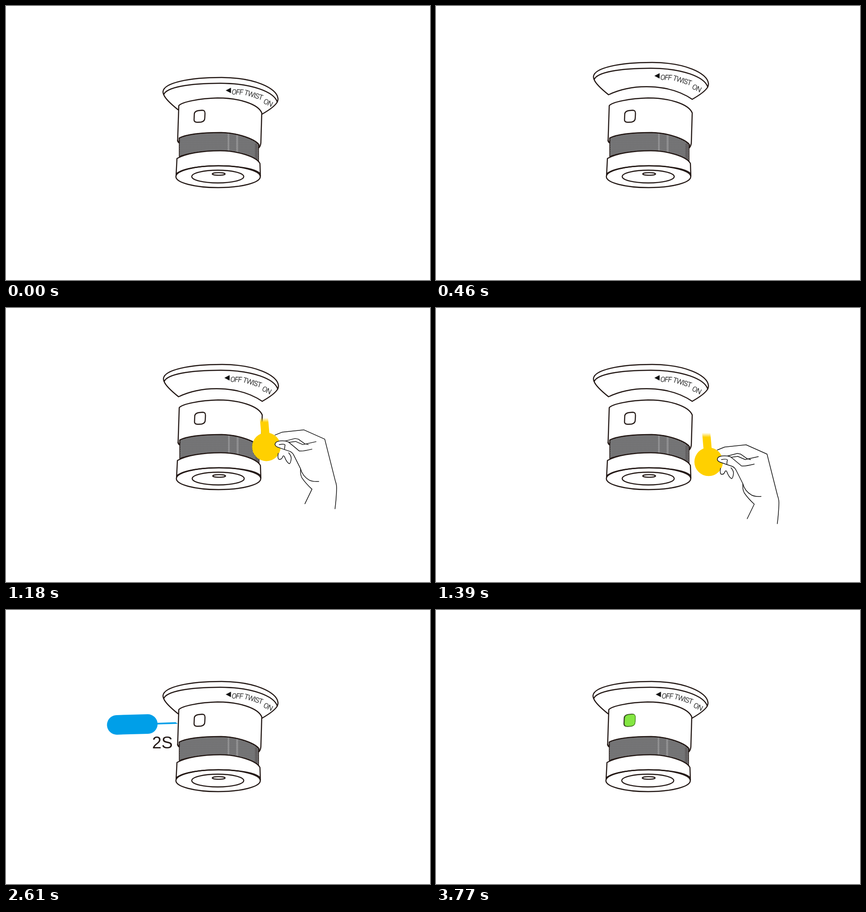
Animation of 930 by 602 pixels, one loop 4.87 s. Source, as an HTML page:

```html
<!DOCTYPE html>
<html lang="en">
<head>
<meta charset="utf-8">
<title>Smoke detector setup</title>
<style>
  html, body { margin: 0; width: 100%; height: 100%; overflow: hidden; background: #fff; }
  svg { display: block; }
  .device path, .device ellipse { fill: #fff; stroke: #231815; stroke-width: 2.4; stroke-linejoin: round; stroke-linecap: round; }
  .device .open { fill: none; }
  .device .mesh { fill: url(#weave); stroke-width: 1.6; }
  .device .streak { fill: none; stroke: #fff; stroke-width: 4; opacity: .2; stroke-linecap: butt; }
  .device .shade { fill: none; stroke-width: 6; opacity: .2; stroke-linecap: butt; }
  #label path { fill: #111; stroke: none; }
  #label text { font: 300 15.5px Roboto, Arial, sans-serif; letter-spacing: -.9px; fill: #111; stroke: #111; stroke-width: .25; }
  #hand .line { fill: #fff; stroke: #111; stroke-width: 1.5; stroke-linejoin: round; stroke-linecap: round; }
  #hand .back { fill: none; }
  #count { font: 37px "Liberation Sans", Arial, sans-serif; fill: #231815; }
</style>
</head>
<body>
<svg width="930" height="602" viewBox="0 0 930 602">
  <defs>
    <pattern id="weave" width="3" height="4" patternUnits="userSpaceOnUse">
      <rect width="3" height="4" fill="#bcbcbf"/>
      <path d="M.5 -1L2.500 1L.5 3L2.500 5" style="fill:none;stroke:#333;stroke-width:1.2"/>
    </pattern>
    <linearGradient id="tip" gradientUnits="userSpaceOnUse" x1="0" y1="213" x2="0" y2="223">
      <stop offset="0" stop-color="#ffd000" stop-opacity="0"/>
      <stop offset="1" stop-color="#ffd000"/>
    </linearGradient>
  </defs>

  <g id="scene">
    <g class="device">
      <g id="plate">
        <path d="M344.5 187.500C347 169 400 157 473 157C545 157.500 594 180 596.500 203Q597 207 595 211C590 220 575 230 561 238C510 203 430 203 377.500 228C365 218 350 205 346 195Q344 191 344.500 187.500Z"/>
        <path class="open" d="M346 194.500C352 179 400 169.700 470 169.700C540 170 588 189 595 211"/>
      </g>
      <g id="label">
        <path d="M482 185.500L493.500 179.500V191.500Z"/>
        <text transform="translate(495 194) rotate(2)" style="font-style:italic">OFF</text>
        <text transform="translate(521.500 194.500) rotate(17)">TWIST</text>
        <text transform="translate(563.500 213) rotate(26)">ON</text>
      </g>
      <g id="body">
        <path d="M379 219C385 211 425 203 464 202C510 202 553 215 561 235L559 301Q558 309 554 312L380 301Q376 298 376.500 295Z"/>
        <path class="mesh" d="M380 290C400 280 440 278 472 278C512 279 545 293 554 304V343C530 324 500 318 470 318C430 318 395 324 380 331Z"/>
        <path class="streak" d="M488 280V319M507 284V322"/>
        <path class="shade" d="M549 302V338"/>
        <path class="open" d="M376.500 295Q377 299 380 300V290C400 280 440 278 472 278C512 279 548 294 555 305L554 312"/>
        <path d="M375 335C395 324 430 318 470 318C505 318 549 330 557 346L558 374L373 374Z"/>
        <ellipse cx="465.200" cy="375" rx="92.500" ry="24"/>
        <path class="open" d="M374 368C390 356 430 351 467 351C510 351 548 358 557 368"/>
        <ellipse cx="464.500" cy="374.800" rx="57" ry="14"/>
        <ellipse cx="466.500" cy="369" rx="14" ry="2.900"/>
        <path id="button" d="M413 238C413 233 416 231 421 230L430 229C435 229 436.500 231 436.500 236L436 246C436 252 433 254 428 255L420 255.500C415 255.500 412.500 254 412.500 250Z"/>
      </g>
    </g>

    <g id="hand">
      <path class="line back" d="M567 251L583 244.500L630 239.500L676 260L699 351Q703 362 702 372Q701 395 698.500 413"/>
      <path fill="url(#tip)" d="M533.500 211H551.500L555 252H537Z"/>
      <circle cx="548" cy="277" r="31.300" fill="#ffd000"/>
      <path class="line" d="M574 291Q572 303 576 304.500Q582 305 584 298Q586 295 588 299Q592 310 598 314Q601 314 602.500 303Q603 297 597 290"/>
      <path class="line back" d="M590 264L611 258.500L618 260L632 270L640 272M597 267L612 265L628 272L657 265.500M623 325Q622 338 626 345Q634 357 648 370L632.500 402"/>
      <path class="line" d="M648 282Q628 287 620 286Q606 274 596 266Q585 262 573 265Q567 267 567 272Q568 276 574 278L588 283L600 287Q606 290 609 297L623 325Q627 341 642 350Q650 354 663 353"/>
      <path class="line back" d="M576 272Q588 270 589 273Q588 277 588 282"/>
    </g>
  </g>

  <g id="pin" fill="#009fe8">
    <rect x="221.500" y="230" width="111" height="43" rx="21.500" transform="rotate(-1.500 277 251.500)"/>
    <path d="M330 248L372 246.500L377 250L330 251.500Z"/>
    <text id="count" x="320.500" y="304"></text>
  </g>
  <path id="light" transform="translate(.8 0)" fill="#84e642" stroke="#4c8c26" stroke-width="1.300"/>
</svg>
<script>
  const LOOP = 4870, STEP = 30;
  const el = id => document.getElementById(id);
  const steps = (t, from) => Math.floor((t - from) / STEP);
  const clamp = (v, lo, hi) => Math.min(hi, Math.max(lo, v));
  const fadeOut = (t, from) => clamp(1 - steps(t, from) / 5, 0, 1);
  const move = (id, x, y) => el(id).setAttribute("transform", `translate(${x} ${y})`);
  const alpha = (id, a) => el(id).setAttribute("opacity", a);

  el("light").setAttribute("d", el("button").getAttribute("d"));

  function draw(t) {
    const apart = t >= 460 && t < 1540;
    move("plate", apart ? 1 : 0, apart ? -33 : 0);
    move("label", apart ? -3 : 0, apart ? -32 : 0);
    move("body", apart ? 1 : 0, 0);
    alpha("scene", t < 460 ? fadeOut(t, 240) : t < 1610 ? fadeOut(t, 1390) : 1);

    const pull = clamp(steps(t, 970), 0, 15) - 1;
    move("hand", pull * 3.85, pull * 4.69);
    alpha("hand", t >= 730 && t < 1540 ? 1 : 0);

    alpha("pin", t < 1740 ? 0 : fadeOut(t, 3050));
    el("count").textContent = t < 2140 ? "" : t < 2610 ? "1S" : "2S";

    // the light pulses up, down and up again, then stays on
    const pulse = clamp(steps(t, 3050), 0, 24);
    alpha("light", 1 - Math.abs(pulse % 16 - 8) / 8);
  }

  const start = performance.now();
  function tick() {
    draw((performance.now() - start) % LOOP);
    requestAnimationFrame(tick);
  }
  tick();
</script>
</body>
</html>
```
